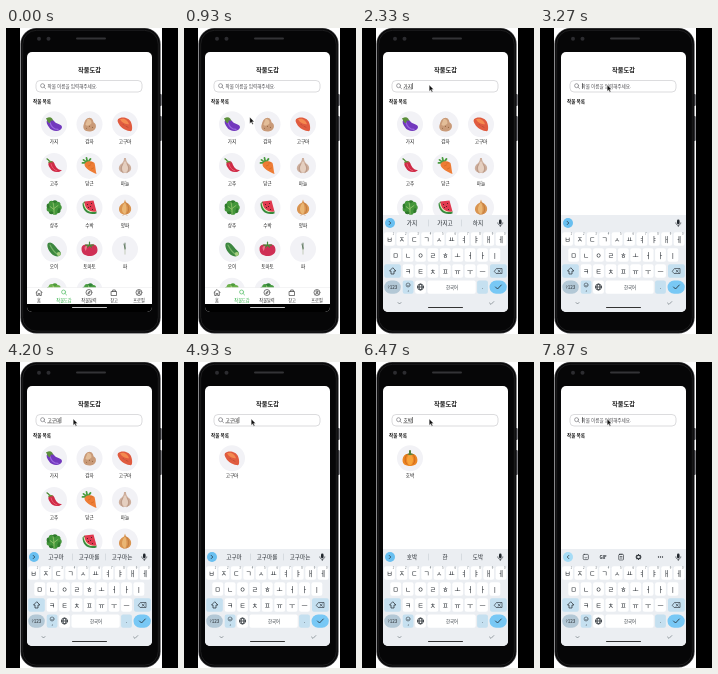
Recreate the animation shown at these times as an HTML page with a canvas. Size 172x306 px, loop 8 s.

```html
<!DOCTYPE html>
<html lang="ko">
<head>
<meta charset="utf-8">
<title>작물도감</title>
<style>
html, body { margin: 0; width: 100%; height: 100%; overflow: hidden; background: #000; }
canvas { display: block; width: 100vw; height: 100vh; }
</style>
</head>
<body>
<canvas id="stage"></canvas>
<script>
const W = 172, H = 306, LOOP = 8000;
const SCREEN = { x: 21, y: 24, w: 125, h: 260 };
const NAV_TOP = 276, KEY_TOP = 187;
const FONT = '"Noto Sans CJK KR", "Noto Sans CJK", "Noto Sans", sans-serif';
const INK = '#1c1c1c', GREEN = '#35b34a';
const canvas = document.getElementById('stage');
const c = canvas.getContext('2d');

// ---------- helpers ----------
function box(x, y, w, h, r, fill, stroke, lw = 0.6) {
  c.beginPath();
  c.roundRect(x, y, w, h, r);
  if (fill) { c.fillStyle = fill; c.fill(); }
  if (stroke) { c.strokeStyle = stroke; c.lineWidth = lw; c.stroke(); }
}
function dot(x, y, r, fill) {
  c.beginPath();
  c.arc(x, y, r, 0, Math.PI * 2);
  c.fillStyle = fill;
  c.fill();
}
function text(s, x, y, size, color = INK, align = 'center', weight = 400) {
  c.font = `${weight} ${size}px ${FONT}`;
  c.textAlign = align;
  c.textBaseline = 'alphabetic';
  c.fillStyle = color;
  c.fillText(s, x, y + size * 0.36);
  return c.measureText(s).width;
}
function shape(d, fill) {
  c.fillStyle = fill;
  c.fill(new Path2D(d));
}
function line(d, color, lw = 0.7) {
  c.strokeStyle = color;
  c.lineWidth = lw;
  c.lineCap = c.lineJoin = 'round';
  c.stroke(new Path2D(d));
}
function at(x, y, draw, ...args) {
  c.save();
  c.translate(x, y);
  draw(...args);
  c.restore();
}
const clamp = v => Math.max(0, Math.min(1, v));
const easeOut = v => 1 - (1 - v) ** 2;
const easeInOut = v => v * v * (3 - 2 * v);

// ---------- crops ----------
function leaves(dark, mid, light) {
  for (let i = 0; i < 9; i++) {
    const a = i * Math.PI * 2 / 9;
    dot(Math.cos(a) * 5, Math.sin(a) * 4.7, 2.7, i % 2 ? dark : mid);
  }
  dot(0, 0, 4.6, mid);
  line('M0 6C0 2 0-1-1-5M0 2L-4-1M0 1L4-2', light, 0.8);
}

const crops = {
  가지() {
    shape('M-7-4C-5-7-1-5 1-2C4 0 8 0 8 3C7 8-2 8-5 3C-7 0-8-2-7-4Z', '#7238bd');
    line('M-4-2C-3 2 0 5 4 5', '#9a66df', 1.2);
    shape('M-8-6L-5-7C-2-7-1-5-1-3L-3-4-4-1-6-2Z', '#5b8f3a');
  },
  감자() {
    shape('M-2-6C2-8 4-4 4-2C8 0 7 6 2 7C-4 8-7 5-6 1C-5-2-5-4-2-6Z', '#c99a78');
    shape('M-2-5C1-6 2-3 2-1C0 2-4 2-4 0Z', '#e3bd98');
    dot(0, 2, 0.6, '#94643f'); dot(3, 3, 0.6, '#94643f'); dot(-3, 4, 0.5, '#94643f');
  },
  고구마() {
    shape('M-7-5C-4-8 4-7 6-2C8 3 7 7 6 7C2 7-4 4-6 0C-7-2-8-3-7-5Z', '#e05b3f');
    shape('M-5-5C-1-7 3-4 4 0C1 0-3-1-5-5Z', '#f4894f');
    line('M1 2L3 3M-2 0L-1 1', '#ab4931', 0.6);
  },
  고추() {
    shape('M-5-4C-2-6 0-4 1-1C3 3 5 4 8 4C4 8-2 6-4 2C-6 0-6-3-5-4Z', '#cf2a46');
    line('M-3-2C-2 2 0 4 3 5', '#ec6175', 0.9);
    line('M-4-4C-5-5-5-6-7-7', '#4d8b34', 1.3);
    shape('M-6-3C-5-6-2-6-1-3L-3-4Z', '#5f9d3c');
  },
  당근() {
    line('M-2-3L-6-6M-2-3L-3-8M-2-3L1-7M-2-3L-7-3', '#4a9c40', 1.8);
    shape('M-5-1C-5-5 2-6 5-3C6 0 6 5 7 8C2 6-4 3-5-1Z', '#ee7c35');
    line('M-1 0L1-1M2 3L4 2M1-3L3-3', '#ca651e', 0.6);
  },
  마늘() {
    shape('M-1-8L1-8C1-4 3-3 5-1C8 3 5 7 0 7C-5 7-8 3-5-1C-3-3-1-4-1-8Z', '#cdae9c');
    shape('M0-5C4 0 4 5 0 7C-4 5-4 0 0-5Z', '#e5cfc0');
    line('M-2-2C-5 2-4 5-2 7M2-2C5 2 4 5 2 7', '#a5816f', 0.5);
  },
  상추() { leaves('#2f7a2c', '#43963a', '#9cca72'); },
  수박() {
    shape('M-7-4C-7 4-1 8 7 6L7 4-5-6Z', '#388c3d');
    shape('M-6-5C-5 3 0 6 7 4Z', '#e5efc0');
    shape('M-5-6C-5 1 0 5 7 4L4-7Z', '#e0394f');
    [[-2, -3], [1, -1], [3, 2], [-1, 0], [2, -4]].forEach(p => dot(...p, 0.55, '#3c1d1d'));
  },
  양파() {
    shape('M0-8L1-5C4-4 7-1 6 3C5 6 2 7 0 7C-3 7-6 5-6 2C-6-2-3-4-1-5Z', '#d99450');
    shape('M0-5C2-1 2 4 0 7C-4 5-4-1 0-5Z', '#eab674');
    line('M1-5C5-1 4 4 2 6M-1 7L-2 8M1 7L2 8', '#aa6530', 0.5);
  },
  오이() {
    shape('M-6-6C-3-8 0-5 2-2C4 1 7 2 7 5C6 8 2 8-1 6C-5 3-8-3-6-6Z', '#3d8740');
    line('M-4-4C-2 0 0 3 3 5', '#76b366', 1.2);
    dot(4.8, 5, 2, '#a7cf80');
  },
  토마토() {
    shape('M-8 0C-8-5-3-5 0-4C4-6 8-4 8 1C8 5 4 7 0 7C-4 7-8 5-8 0Z', '#cf2f55');
    shape('M-5-1C-5-3-3-3-2-3C-3-1-3 1-4 2Z', '#e9758c');
    line('M0-4L0-7M0-4L-4-4M0-4L4-4M0-4L-2-2M0-4L2-2', '#438b39', 1.2);
  },
  파() {
    line('M0 5L0-1', '#c9cfc0', 1.1);
    line('M0 0L0-6M0-1L-1-5', '#4f6a50', 0.8);
  },
  배추() { leaves('#4f9b3b', '#6cb04c', '#cfe59a'); },
  시금치() { leaves('#2f8237', '#4a9d43', '#a8d480'); },
  호박() {
    shape('M0-4C8-7 10 6 4 7C2 8-2 8-4 7C-10 6-8-7 0-4Z', '#ec8625');
    shape('M0-4C4-3 4 6 0 7C-4 6-4-3 0-4Z', '#f7a43c');
    line('M-3-4C-6 0-5 4-3 6M3-4C6 0 5 4 3 6', '#bd5a18', 0.6);
    shape('M-3-4L-1-5-1-8 1-8 1-5 4-4 0-3Z', '#56803a');
  }
};
const ALL = Object.keys(crops).slice(0, 14);

// ---------- timeline: [time, query, suggestions, listed crops] ----------
const TOOLS = null, BLANK = [];
const steps = [
  [0, '', TOOLS, ALL],
  [1870, 'ㄱ', ['ㄱ', '그', '그래'], ALL],
  [2000, '가', ['가', '가서', '가장'], ALL],
  [2130, '갖', ['갖', '갖고', '가지'], ALL],
  [2270, '가지', ['가지', '가지고', '하지'], ALL],
  [2670, '가지', ['가지', '가지고', '하지'], ['가지']],
  [3070, '가', ['가', '가서', '가장'], ['가지']],
  [3200, '', BLANK, []],
  [3330, '', TOOLS, []],
  [3600, 'ㄱ', ['ㄱ', '그', '그래'], ALL],
  [3670, '고', ['고', '그리고', '고기'], ALL],
  [3800, '곡', ['곡', '고구마', '고기'], ALL],
  [3870, '고구', ['고구', '고구마', '고국'], ALL],
  [4000, '고굼', ['고굼', '고구마', '고국'], ALL],
  [4070, '고구마', ['고구마', '고구마를', '고구마는'], ALL],
  [4670, '고구마', ['고구마', '고구마를', '고구마는'], ['고구마']],
  [5070, '고구', ['고구', '고구마', '고국'], ['고구마']],
  [5200, '고', ['고', '그리고', '고기'], []],
  [5330, '', BLANK, []],
  [5670, '', TOOLS, []],
  [5730, 'ㅎ', ['ㅎ', 'ㅎㅎ', '하'], []],
  [5800, '호', ['호', '혹시', '오'], []],
  [5930, '홉', ['홉', '호', '혹시'], []],
  [6000, '호바', ['호바', '호박', '도바'], []],
  [6130, '호박', ['호박', '한', '도박'], []],
  [6270, '호박', ['호박', '한', '도박'], ['호박']],
  [7000, '호바', ['호바', '호박', '도바'], ['호박']],
  [7130, '호', ['호', '혹시', '오'], []],
  [7330, '', BLANK, []],
  [7470, '', TOOLS, []]
];
const stateAt = t => steps.findLast(s => s[0] <= t);

// ---------- app ----------
function phone() {
  c.fillStyle = '#000';
  c.fillRect(0, 0, W, H);
  c.fillStyle = '#fff';
  c.fillRect(14, 0, 142, H);
  box(153, 66, 2.6, 12, 1, '#24242a');
  box(153, 88, 2.6, 25, 1, '#24242a');
  box(14.4, 0, 140.2, 305.5, 16, '#3a3a3c');
  box(15.2, 0.8, 138.6, 303.9, 15.2, '#060607');
  box(16.7, 2.3, 135.6, 300.9, 13.8, null, '#2c2c2e', 0.6);
  box(70, 9.4, 30, 2, 1, '#333336');
  dot(33, 10.8, 2, '#2c2c30');
  dot(42.5, 10.8, 2, '#2c2c30');
}

function lens(x, y, color) {
  at(x, y, line, 'M2 0A2 2 0 1 1-2 0A2 2 0 1 1 2 0M1.5 1.5L3 3', color, 0.6);
}

function searchBar(query, focused, caretOn) {
  box(30, 52.5, 106, 11.5, 4, '#fff', '#c4c4c8', 0.6);
  lens(36.6, 57.7, '#66666b');
  const w = query ? text(query, 41.5, 58, 4.7, '#222', 'left') : 0.4;
  if (!query) text('작물 이름을 입력해주세요.', 41.5, 58, 4.6, '#4c4c50', 'left');
  if (focused && caretOn) box(41.7 + w, 55, 0.6, 6, 0, '#333');
  if (query) line(`M41.5 61L${41.5 + w} 61`, '#555', 0.4);
}

function cropList(names) {
  names.forEach((name, i) => {
    const x = 48 + i % 3 * 35.5, y = 96.3 + Math.floor(i / 3) * 41.6;
    dot(x, y, 13, '#f2f2f6');
    at(x, y, crops[name]);
    text(name, x, y + 17.4, 4.6, INK, 'center', 500);
  });
}

const tabs = [
  ['홈', 'M-3 0L0-3 3 0M-2.3-.5V3H-.7V1H.7V3H2.3V-.5'],
  ['작물도감', ''],
  ['작물달력', 'M3 0A3 3 0 1 1-3 0A3 3 0 1 1 3 0M-1 1L-.5-.5 1.2-1.2.5.5Z'],
  ['창고', 'M-2.5-1H2.5V3H-2.5ZM-1.3-1V-2.5H1.3V-1'],
  ['프로필', 'M3 0A3 3 0 1 1-3 0A3 3 0 1 1 3 0M1-.8A1 1 0 1 1-1-.8A1 1 0 1 1 1-.8M-2 2C-1 .5 1 .5 2 2']
];
function tabBar(y) {
  box(21, y, 125, 17, 0, '#fff');
  line(`M21 ${y}H146`, '#e3e3e6', 0.4);
  tabs.forEach(([name, icon], i) => {
    const x = 33 + i * 25, color = i === 1 ? GREEN : '#333';
    if (icon) at(x, y + 5, line, icon, color, 0.65);
    else lens(x - 0.4, y + 4.5, color);
    text(name, x, y + 12.6, 4.2, color, 'center', 500);
  });
}

// ---------- keyboard ----------
const KEY = '#fff', SOFT = '#c5e0f0', BLUE = '#78c8f5', GLYPH = '#20262c', BOARD = '#ebeef2';

function toolbar(words) {
  const y = 195;
  dot(28, y, 5, words ? '#68bff0' : '#a6dcf6');
  line(words ? 'M27.2 193.4L28.8 195 27.2 196.6' : 'M28.8 193.4L27.2 195 28.8 196.6', GLYPH, 0.7);
  box(137, y - 3.4, 2.6, 4.6, 1.3, GLYPH);
  line('M135.8 194.8C135.8 198.2 140.8 198.2 140.8 194.8M138.3 197.4V198.6', GLYPH, 0.6);
  if (words) {
    words.forEach((w, i) => text(w, 50 + i * 33, y, 5.6, GLYPH, 'center', i ? 400 : 500));
    if (words.length) line('M66.5 192V198M99.5 192V198', '#c0c8ce', 0.5);
    return;
  }
  box(43.2, y - 2.6, 5.2, 5.2, 1, null, GLYPH);
  line('M44.8 195.4C45.3 196.4 46.5 196.4 47 195.4', GLYPH, 0.5);
  text('GIF', 63, y, 4.4, GLYPH, 'center', 700);
  box(78.7, y - 2.6, 4.8, 5.6, 0.8, null, GLYPH);
  line('M80 192.2H82.2M80.2 194.5H82M80.2 196H82', GLYPH, 0.6);
  for (let i = 0; i < 8; i++) {
    const a = i * Math.PI / 4;
    dot(98.5 + Math.cos(a) * 2.3, y + Math.sin(a) * 2.3, 0.7, GLYPH);
  }
  dot(98.5, y, 2.3, GLYPH);
  dot(98.5, y, 1.3, BOARD);
  for (let i = -1; i < 2; i++) dot(120.5 + i * 2, y, 0.65, GLYPH);
}

function keyRow(chars, x, y, numbered) {
  [...chars].forEach((ch, i) => {
    const cx = x + i * 12.4;
    box(cx - 5.4, y - 6.7, 10.8, 13.4, 2, KEY);
    text(ch, cx, y + 0.3, 6.7, GLYPH, 'center', 500);
    if (numbered) text((i + 1) % 10, cx + 3.8, y - 4.7, 2.8, '#59636b');
  });
}

function keyboard(offset, words) {
  c.save();
  c.translate(0, offset);
  box(21, KEY_TOP, 125, 98, 0, BOARD);
  toolbar(words);
  keyRow('ㅂㅈㄷㄱㅅㅛㅕㅑㅐㅔ', 27.5, 211, true);
  keyRow('ㅁㄴㅇㄹㅎㅗㅓㅏㅣ', 33.7, 227);
  keyRow('ㅋㅌㅊㅍㅠㅜㅡ', 46.1, 243);
  box(22.2, 236.3, 16.6, 13.4, 2, SOFT);
  line('M30.5 240L27.5 243H29V246H32V243H33.5Z', GLYPH, 0.7);
  box(128, 236.3, 16.8, 13.4, 2, SOFT);
  line('M132.5 243L134.5 240.5H140V245.5H134.5ZM136 242L138.4 244.3M138.4 242L136 244.3', GLYPH, 0.6);

  box(22.2, 252.5, 16.6, 13.2, 6.6, '#b3c8d6');
  text('?123', 30.5, 259.2, 4.6, GLYPH);
  box(40.7, 252.5, 10.8, 13.2, 2, SOFT);
  at(46.1, 257, line, 'M2 0A2 2 0 1 1-2 0A2 2 0 1 1 2 0M-.9.5C-.4 1.1.4 1.1.9.5', GLYPH, 0.5);
  text(',', 46.1, 261.3, 5, GLYPH);
  box(53.1, 252.5, 10.8, 13.2, 2, KEY);
  at(58.5, 259, line, 'M3 0A3 3 0 1 1-3 0A3 3 0 1 1 3 0M-3 0H3M0-3C-2-1-2 1 0 3M0-3C2-1 2 1 0 3', GLYPH, 0.8);
  box(65.5, 252.5, 48.2, 13.2, 2, KEY);
  text('한국어', 90, 259.2, 4.4, '#30383f', 'center', 500);
  box(115.1, 252.5, 10.8, 13.2, 2, SOFT);
  text('.', 120.5, 259, 6, GLYPH);
  box(127.5, 252.5, 17.3, 13.2, 6.6, BLUE);
  line('M133.5 259L135.5 261 139.3 257', GLYPH, 0.8);
  line('M36 274.5L37.5 276 39 274.5', '#59636b', 0.6);
  line('M127.5 275L129 276.4 131.8 273.6', '#59636b', 0.6);
  c.restore();
}

// Black system bar that fades away while the keyboard slides up.
function navBar(alpha) {
  const shade = c.createLinearGradient(0, NAV_TOP - 5, 0, NAV_TOP);
  shade.addColorStop(0, 'rgba(0,0,0,0)');
  shade.addColorStop(1, 'rgba(0,0,0,0.3)');
  c.globalAlpha = alpha;
  if (alpha < 1) box(21, NAV_TOP - 5, 125, 5, 0, shade);
  box(21, NAV_TOP, 125, 8, 0, '#000');
  c.globalAlpha = 1;
  box(66, 279, 35, 1.1, 0.5, alpha > 0 ? '#c8c8c8' : '#333');
}

function pointer(t) {
  if (t < 330) return;
  const k = easeInOut(clamp((t - 330) / 800));
  at(58 + 9.2 * k, 266 - 209 * k, () => {
    const d = 'M0 0V6.2L1.5 4.9 2.6 7.2 3.6 6.7 2.5 4.5H4.4Z';
    shape(d, '#111');
    line(d, '#fff', 0.4);
  });
}

function draw(t) {
  const [since, query, words, names] = stateAt(t);
  const focused = t >= 1200;
  const blink = Math.floor((t - Math.max(since, 1200)) / 500) % 2 === 0;
  const slide = clamp((t - 1270) / 290);
  const rise = easeOut(slide);

  phone();
  c.save();
  box(SCREEN.x, SCREEN.y, SCREEN.w, SCREEN.h, 5, '#fff');
  c.clip();
  text('작물도감', 83.5, 41.8, 6.2, INK, 'center', 700);
  searchBar(query, focused, blink);
  text('작물 목록', 27, 73, 4.6, INK, 'left', 700);
  cropList(names);
  if (t < 1330) {
    tabBar(259.5);
  } else if (t < 1530) {
    box(21, 187, 125, 98, 0, '#e7f5e9');
    tabBar(170.5);
  }
  if (rise > 0) {
    c.globalAlpha = 0.3 + 0.7 * rise;
    keyboard(97 * (1 - rise), words);
    c.globalAlpha = 1;
  }
  navBar(1 - slide);
  c.restore();
  pointer(t);
}

function frame(now) {
  const dpr = window.devicePixelRatio || 1;
  const w = Math.round(innerWidth * dpr), h = Math.round(innerHeight * dpr);
  if (canvas.width !== w || canvas.height !== h) {
    canvas.width = w;
    canvas.height = h;
  }
  c.setTransform(w / W, 0, 0, h / H, 0, 0);
  draw(now % LOOP);
  requestAnimationFrame(frame);
}
requestAnimationFrame(frame);
</script>
</body>
</html>
```
